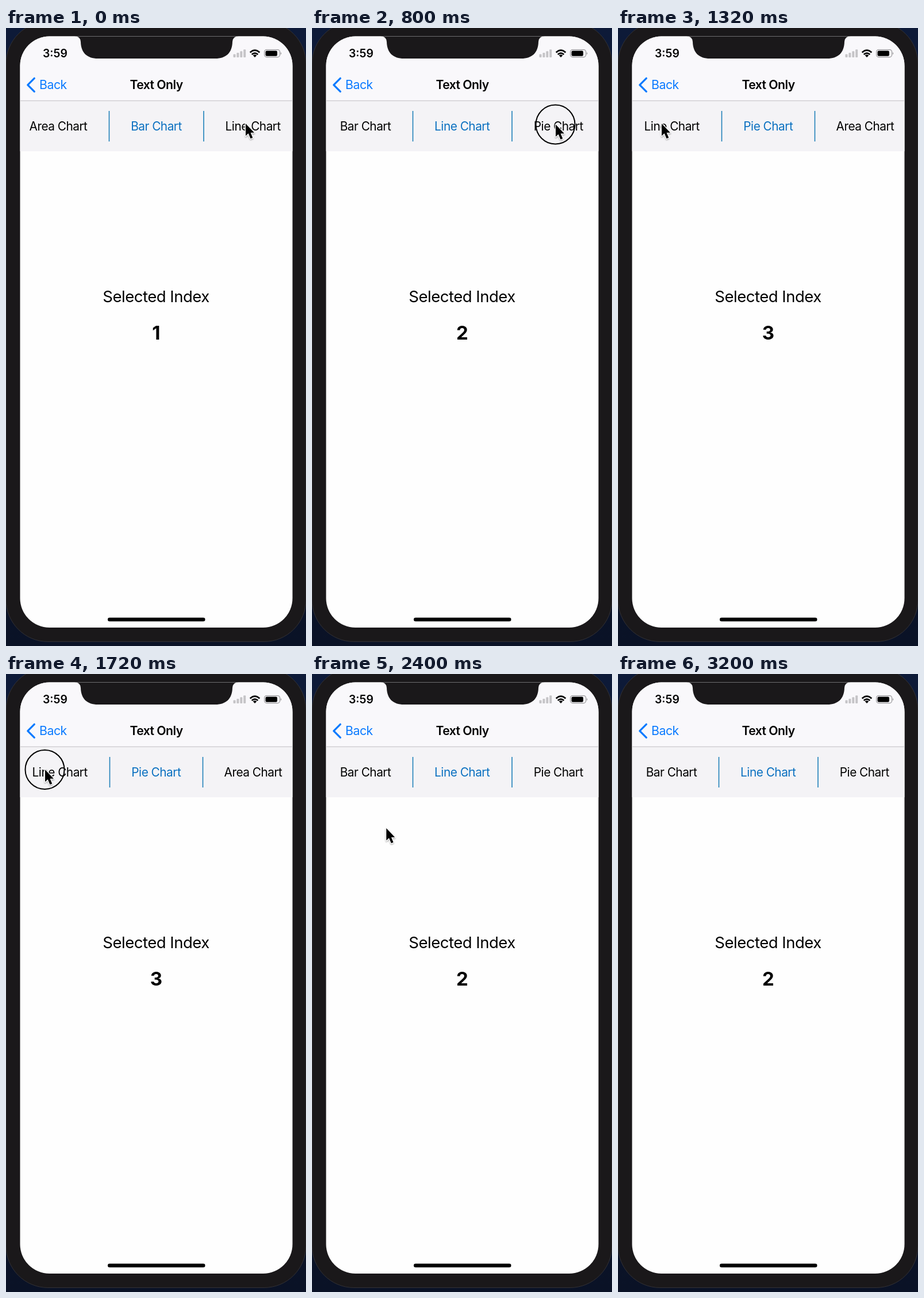
An HTML page that plays this animation: 522 px wide and 1073 px high, repeating every 3.32 s.

```html
<!DOCTYPE html>
<html lang="en">
<head>
<meta charset="utf-8">
<title>Text Only</title>
<style>
  html, body { margin: 0; width: 100%; height: 100%; overflow: hidden; background: #0b1630; }
  svg { display: block; width: 100%; height: 100%; font-family: Inter, Roboto, sans-serif; }
  .tab { font-size: 20.8px; letter-spacing: -.5px; text-anchor: middle; }
  .mid { text-anchor: middle; }
</style>
</head>
<body>
<svg viewBox="0 0 522 1073">
  <defs>
    <linearGradient id="desk" x2="0" y2="1">
      <stop stop-color="#0d1a38"/><stop offset="1" stop-color="#0a1226"/>
    </linearGradient>
    <clipPath id="screen"><rect x="24.5" y="14.5" width="474" height="1026.5" rx="51"/></clipPath>
    <filter id="shadow" x="-50%" y="-50%" width="200%" height="200%">
      <feDropShadow dx="0" dy="1.5" stdDeviation="1.2" flood-opacity=".35"/>
    </filter>
  </defs>

  <rect width="522" height="1073" fill="url(#desk)"/>
  <rect x="0" y="-11" width="522" height="1076.5" rx="73" fill="#1a181a" stroke="#323135"/>

  <g clip-path="url(#screen)">
    <rect y="14" width="522" height="1028" fill="#fefefe"/>
    <rect y="14" width="522" height="112" fill="#f9f8fb"/>
    <rect y="126" width="522" height="88" fill="#f4f3f6"/>
    <rect y="125.7" width="522" height="1.2" fill="#c9c8cb"/>
    <g id="strip"></g>
    <path fill="#1a181a" d="M119 14 Q129.5 14.5 130 24 C130.500 43 141 53 160 53 H364 C383 53 393.500 43 394 24 Q394.500 14.500 405 14Z"/>
  </g>

  <text x="64" y="51" font-size="19.4" font-weight="600">3:59</text>
  <g fill="#c5c4c7">
    <rect x="395.500" y="45.500" width="4" height="5.500" rx="1"/>
    <rect x="401.400" y="43" width="4" height="8" rx="1"/>
    <rect x="407.300" y="40.200" width="4" height="10.800" rx="1"/>
    <rect x="413.200" y="37.200" width="4" height="13.800" rx="1"/>
  </g>
  <g fill="none" stroke="#000" stroke-width="2.700">
    <path d="M424.700 42.600 Q433 34.800 441.300 42.600"/>
    <path d="M427.700 46 Q433 41.200 438.300 46"/>
    <path fill="#000" stroke="none" d="M429.700 47.500 Q433 44.800 436.300 47.500 L433 51Z"/>
  </g>
  <rect x="449.600" y="37.600" width="27" height="13" rx="4" fill="none" stroke="#98979a" stroke-width="1.200"/>
  <rect x="451.500" y="39.500" width="20.500" height="9.200" rx="2.200"/>
  <path d="M478 42 Q480.500 44 478 46.300Z" fill="#98979a"/>

  <path d="M49.300 87.300 L37.800 98.800 L49.300 110.300" fill="none" stroke="#0a7aff" stroke-width="3.300" stroke-linecap="round" stroke-linejoin="round"/>
  <text x="58" y="106" font-size="21.300" letter-spacing="-.5" fill="#0a7aff">Back</text>
  <text class="mid" x="261.500" y="106" font-size="21.200" font-weight="600" letter-spacing="-.55">Text Only</text>
  <text class="mid" x="261" y="476.300" font-size="27.500" letter-spacing="-.5">Selected Index</text>
  <text class="mid" id="index" x="261.300" y="540.500" font-size="33" font-weight="700">1</text>
  <rect x="177" y="1023.800" width="169.500" height="6.400" rx="3.200"/>

  <g id="cursor">
    <circle id="ring" cx="-.5" cy="0" r="34" fill="none" stroke="#000" stroke-width="2"/>
    <path filter="url(#shadow)" d="M0 0 V21.300 L4.700 17 L8.500 26 L12.300 24.400 L8.600 15.700 H15Z" stroke="#fff" stroke-width="2.400" paint-order="stroke" stroke-linejoin="round"/>
  </g>
</svg>
<script>
const LOOP = 3320, STEP = 40, SLIDE = 300;
const $ = id => document.getElementById(id);

const tabs = [['Area Chart', 91], ['Bar Chart', 261.5], ['Line Chart', 429.7], ['Pie Chart', 597.3], ['Area Chart', 766]];
const dividers = [4, 179.5, 344, 516.5, 678.5];
const offsets = [-170, 0, 168.5, 336];

// Each click: when it is pressed, when the slide begins, the chosen tab.
const clicks = [
  { press: 120, start: 206, tab: 2 },
  { press: 760, start: 842, tab: 3 },
  { press: 1680, start: 1760, tab: 2 }
];

// time, x, y of the pointer tip
const pointer = [
  [0, 417, 166], [210, 417, 166], [320, 402, 170], [440, 363, 179], [540, 364, 180],
  [740, 424, 168], [860, 424, 167], [1040, 148, 172], [1160, 88, 168], [1400, 70, 165],
  [1680, 68, 166], [1800, 68, 166], [2080, 81, 167], [2260, 81, 167], [2460, 150, 311],
  [2600, 220, 230], [2720, 292, 75], [2800, 434, 9], [2840, 480, -40]
];

function add(tag, attrs, text = '') {
  const node = document.createElementNS($('strip').namespaceURI, tag);
  for (const key in attrs) node.setAttribute(key, attrs[key]);
  node.textContent = text;
  return $('strip').appendChild(node);
}

for (const x of dividers) add('rect', { x: x - .8, y: 144, width: 1.6, height: 53, fill: '#1f80b8' });
const labels = tabs.map(([name, x]) => add('text', { class: 'tab', x, y: 178 }, name));

const ease = p => p * p * (3 - 2 * p);
const mix = (a, b, p) => a + (b - a) * p;

function pointerAt(t) {
  const i = pointer.findIndex(key => key[0] > t);
  if (i < 0) return pointer.at(-1).slice(1);
  const [t0, x0, y0] = pointer[i - 1], [t1, x1, y1] = pointer[i];
  const p = (t - t0) / (t1 - t0);
  return [mix(x0, x1, p), mix(y0, y1, p)];
}

function draw(t) {
  let selected = 1, scroll = 0, pressed = false;
  for (const { press, start, tab } of clicks) {
    pressed ||= t >= press && t < start;
    if (t < start) continue;
    scroll = mix(scroll, offsets[tab], ease(Math.min(1, (t - start) / SLIDE)));
    selected = tab;
  }
  $('strip').setAttribute('transform', `translate(${-scroll} 0)`);
  labels.forEach((label, i) => label.setAttribute('fill', i === selected ? '#0a70c0' : '#000'));
  $('index').textContent = selected;
  $('cursor').setAttribute('transform', `translate(${pointerAt(t)})`);
  $('ring').style.display = pressed ? '' : 'none';
}

const began = performance.now();
function frame() {
  const t = (performance.now() - began) % LOOP;
  draw(Math.floor(t / STEP) * STEP);
  requestAnimationFrame(frame);
}
frame();
</script>
</body>
</html>
```
